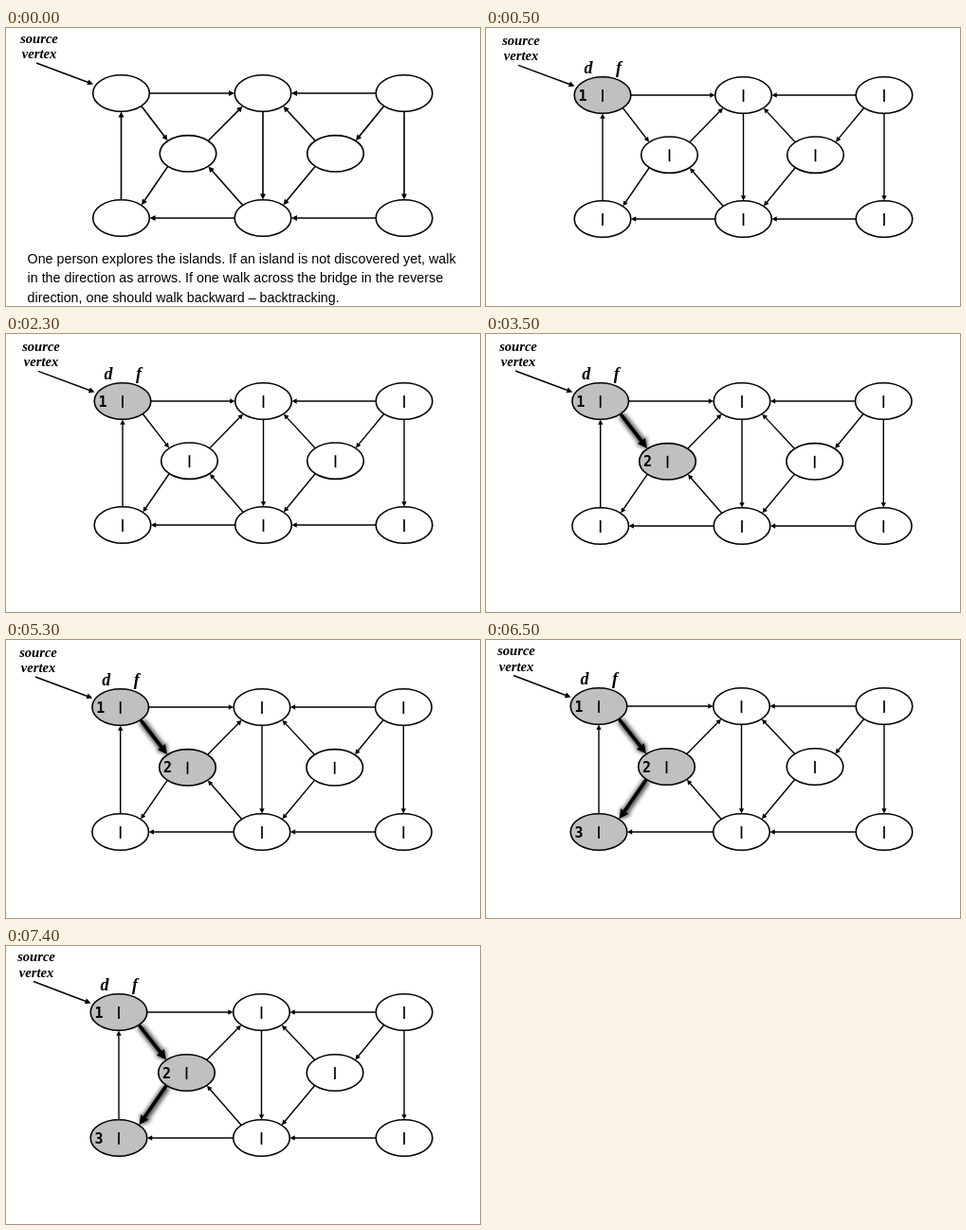
Recreate the animation shown at these times as an HTML page. Size 500x294 px, loop 8 s.

```html
<!DOCTYPE html>
<html lang="en">
<head>
<meta charset="utf-8">
<title>Depth-first search</title>
<style>
  html, body { margin: 0; width: 100%; height: 100%; overflow: hidden; background: #fff; }
  svg { display: block; width: 100vw; height: 100vh; }
  .scene { visibility: hidden; animation: 8s step-end infinite; }
  .scene:nth-of-type(1) { animation-name: intro; }
  .scene:nth-of-type(2) { animation-name: first; }
  .scene:nth-of-type(3) { animation-name: second; }
  .scene:nth-of-type(4) { animation-name: third; }
  @keyframes intro { 0% { visibility: visible; } 6.25%, 100% { visibility: hidden; } }
  @keyframes first { 0% { visibility: hidden; } 6.25% { visibility: visible; } 43.75%, 100% { visibility: hidden; } }
  @keyframes second { 0% { visibility: hidden; } 43.75% { visibility: visible; } 81.25%, 100% { visibility: hidden; } }
  @keyframes third { 0% { visibility: hidden; } 81.25%, 100% { visibility: visible; } }
  ellipse, line { stroke: #000; }
  .label { font: italic bold 14.6px "Liberation Serif", "Times New Roman", serif; text-anchor: middle; }
  .head { font-size: 18px; }
  .num { font: bold 15px "DejaVu Sans Mono", monospace; text-anchor: middle; }
  .note { font: 14.27px "Liberation Sans", Arial, sans-serif; }
</style>
</head>
<body>
<svg id="stage" viewBox="0 0 500 294" preserveAspectRatio="none">
  <defs>
    <filter id="blur" filterUnits="userSpaceOnUse" x="0" y="0" width="500" height="294">
      <feGaussianBlur stdDeviation="2.2"/>
    </filter>
  </defs>
</svg>
<script>
const stage = document.getElementById('stage');

function add(parent, tag, attrs, text) {
  const el = document.createElementNS('http://www.w3.org/2000/svg', tag);
  for (const key in attrs) el.setAttribute(key, attrs[key]);
  if (text) el.textContent = text;
  parent.appendChild(el);
  return el;
}

function arrow(g, x1, y1, x2, y2, width, len, half) {
  const a = Math.atan2(y2 - y1, x2 - x1), c = Math.cos(a), s = Math.sin(a);
  const bx = x2 - len * c, by = y2 - len * s;
  add(g, 'line', { x1, y1, x2: bx + c, y2: by + s, 'stroke-width': width });
  add(g, 'path', { d: `M${x2} ${y2}L${bx - half * s} ${by + half * c}L${bx + half * s} ${by - half * c}Z` });
}

// Edge: from, to, horizontal and vertical direction
const edges = [
  ['A', 'B', 1, 0], ['C', 'B', -1, 0], ['A', 'D', 1, 1], ['D', 'B', 1, -1],
  ['D', 'F', -1, 1], ['G', 'D', -1, -1], ['B', 'G', 0, 1], ['E', 'B', -1, -1],
  ['E', 'G', -1, 1], ['C', 'E', -1, 1], ['C', 'H', 0, 1], ['H', 'G', -1, 0],
  ['G', 'F', -1, 0], ['F', 'A', 0, -1]
];

function scene({ cols: [l, m, r], mids: [ml, mr], rows: [t, c, b], start, found, path, plain }) {
  const g = add(stage, 'g', { class: 'scene' });
  const nodes = {
    A: [l, t], B: [m, t], C: [r, t], D: [ml, c], E: [mr, c], F: [l, b], G: [m, b], H: [r, b]
  };
  const [sx, sy] = start;
  const thin = plain ? 1.6 : 1.4;

  for (const [id, [cx, cy]] of Object.entries(nodes)) {
    const n = found.indexOf(id) + 1;
    add(g, 'ellipse', { cx, cy, rx: 29.8, ry: 19.2, fill: n ? '#c0c0c0' : '#fff', 'stroke-width': 1.6 });
    if (plain) continue;
    add(g, 'line', { x1: cx, y1: cy - 6, x2: cx, y2: cy + 7, 'stroke-width': 1.7 });
    if (n) add(g, 'text', { x: cx - 21, y: cy + 5.5, class: 'num' }, String(n));
  }

  for (const [from, to, dx, dy] of edges) {
    const [x1, y1] = nodes[from], [x2, y2] = nodes[to];
    const ox = dx * (dy ? 21.5 : 30), oy = dy * (dx ? 13.8 : 19.5);
    const ends = [x1 + ox, y1 + oy, x2 - ox, y2 - oy];
    if (path.includes(from + to)) {
      const shade = add(g, 'g', { filter: 'url(#blur)', opacity: 0.65, transform: 'translate(.8 .8)' });
      arrow(shade, ...ends, 8, 11, 7);
      arrow(g, ...ends, 3.6, 10, 5);
    } else {
      arrow(g, ...ends, thin, plain ? 6 : 5.2, plain ? 3 : 2.7);
    }
  }

  add(g, 'text', { x: sx, y: sy, class: 'label' }, 'source');
  add(g, 'text', { x: sx, y: sy + 16.5, class: 'label' }, 'vertex');
  arrow(g, sx - 3, sy + 21.5, l - 29.5, t - 9.5, thin, 6, 3);

  if (plain) {
    const lines = [
      'One person explores the islands. If an island is not discovered yet, walk',
      'in the direction as arrows. If one walk across the bridge in the reverse',
      'direction, one should walk backward – backtracking.'
    ];
    lines.forEach((line, i) => add(g, 'text', { x: 22.6, y: 249 + i * 20.4, class: 'note' }, line));
  } else {
    add(g, 'text', { x: l - 15, y: t - 23.3, class: 'label head' }, 'd');
    add(g, 'text', { x: l + 17, y: t - 23.3, class: 'label head' }, 'f');
  }
}

scene({ cols: [121.5, 271, 420], mids: [192, 347.5], rows: [69, 132.8, 201],
        start: [35, 15.5], found: '', path: [], plain: true });
scene({ cols: [123, 271.5, 420], mids: [193.5, 347.5], rows: [71, 134.2, 202],
        start: [37, 17.8], found: 'A', path: [] });
scene({ cols: [120.7, 270, 419.3], mids: [191.5, 346.7], rows: [71, 134.8, 203],
        start: [34, 17.5], found: 'AD', path: ['AD'] });
scene({ cols: [119, 269.5, 420], mids: [190.5, 347], rows: [70, 134, 203],
        start: [32, 16], found: 'ADF', path: ['AD', 'DF'] });
</script>
</body>
</html>
```
